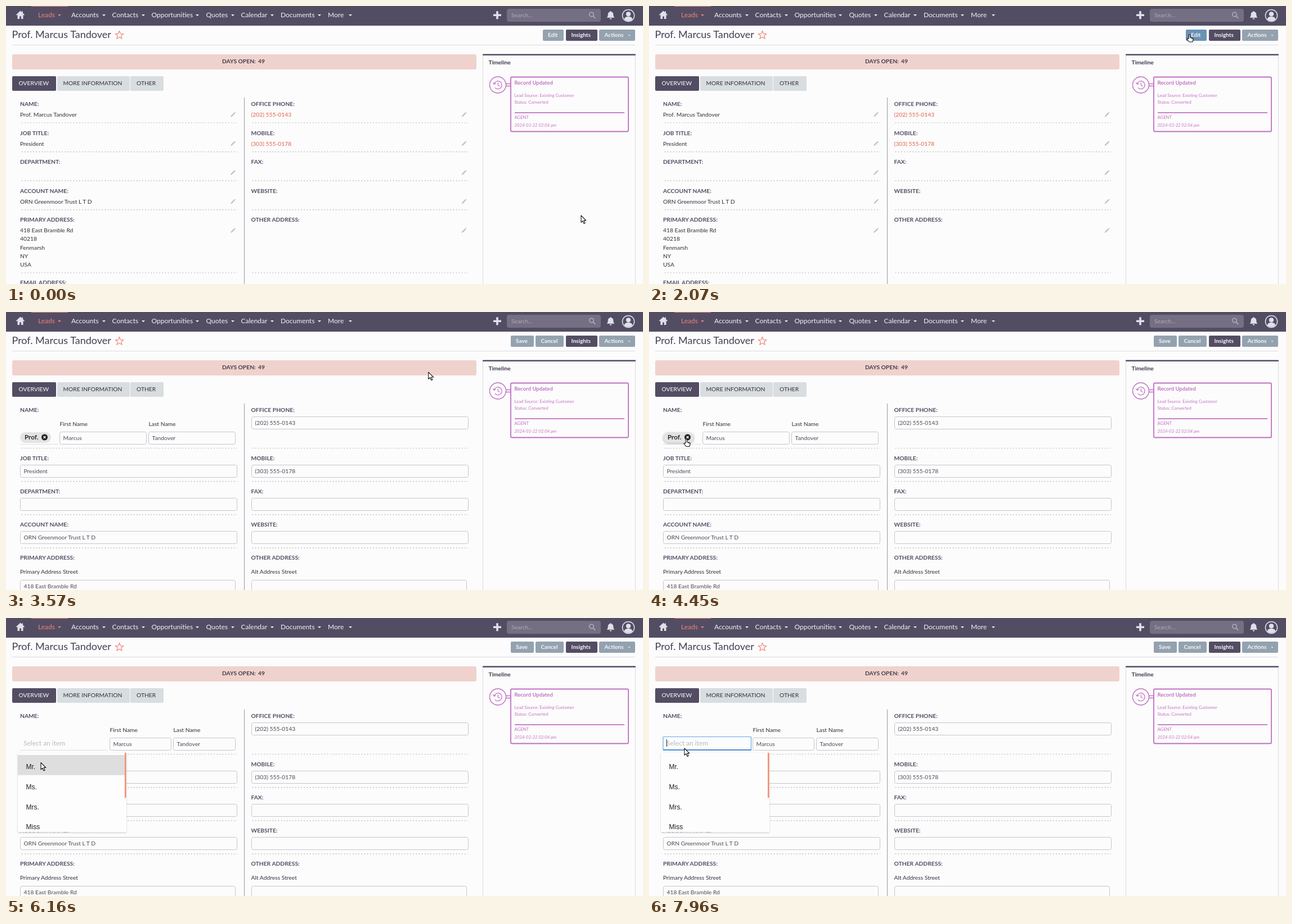
These frames come from a looping animation (1132x495 px, 7.99 s). An HTML page:

```html
<!DOCTYPE html>
<html lang="en">
<head>
<meta charset="utf-8">
<title>Lead record</title>
<style>
html, body { margin: 0; width: 100%; height: 100%; overflow: hidden; background: #fcfcfc; }
svg { display: block; width: 100vw; height: 100vh; }
text { font-family: Lato, sans-serif; font-size: 10.3px; fill: #353039; white-space: pre; }
.nav { font-size: 12px; fill: #f3f2f7; }
.label { font-weight: 700; fill: #534d64; }
.btn { font-size: 10px; font-weight: 700; fill: #f5f5f7; }
.link { fill: #e5604c; }
.field { fill: #4d4a55; }
.small { font-size: 7.7px; fill: #c274c4; }
.chip { font-size: 11.6px; font-weight: 700; fill: #2b2b2b; }
.hint { font-size: 12px; fill: #b9b9bd; }
.item { font-family: "Liberation Sans", Arial, sans-serif; font-size: 12px; fill: #222; }
</style>
</head>
<body>
<svg id="stage" viewBox="0 0 1132 495" preserveAspectRatio="none"></svg>
<script>
const LOOP = 7990;
const DARK = '#534d64', GREY = '#94a2af', BLUE = '#6a92b4', CORAL = '#f08377', PURPLE = '#bf6fc1', ICON = '#dfe1ea';
const FIRST = 'Marcus', LAST = 'Tandover', COMPANY = 'ORN Greenmoor Trust L T D';
const PHONES = ['(202) 555-0143', '(303) 555-0178'], STREET = '418 East Bramble Rd';

const text = (x, y, s, cls = '', extra = '') => `<text x="${x}" y="${y}" class="${cls}" ${extra}>${s}</text>`;
const rect = (x, y, w, h, fill, r = 0, extra = '') =>
  `<rect x="${x}" y="${y}" width="${w}" height="${h}" rx="${r}" fill="${fill}" ${extra}/>`;
const path = (d, stroke, w = 1, fill = 'none', extra = '') =>
  `<path d="${d}" stroke="${stroke}" stroke-width="${w}" fill="${fill}" ${extra}/>`;
const circle = (x, y, r, fill, extra = '') => `<circle cx="${x}" cy="${y}" r="${r}" fill="${fill}" ${extra}/>`;
const group = (id, body) => `<g id="${id}">${body}</g>`;
const caret = (x, y, fill, s = 3) => path(`M${x - s} ${y - s / 2}h${2 * s}l${-s} ${s}z`, 'none', 0, fill);
const dots = (x, y) => path(`M${x} ${y}H${x + 383}`, '#8e8e94', 1.2, 'none', 'stroke-dasharray="1.2 3.9"');
const input = (x, y, w, s = '', h = 22) =>
  rect(x + .5, y + .5, w - 1, h, '#fcfcfc', 3, 'stroke="#c6c6cd"') + text(x + 6.5, y + 14.6, s, 'field');
const button = (x, w, s, fill, tx, id = '') =>
  rect(x, 42, w, 20, fill, 2, id && `id="${id}"`) + text(tx, 55.3, s, 'btn');
const pencil = (x, y) => path(`M${x - 4} ${y + 4}l1-2.6 5.4-5.4 1.8 1.8-5.4 5.4z`, 'none', 0, '#c4c4c9') +
  path(`M${x + 2.8} ${y - 3.8}l1.2-1 1 1-1.1 1.2z`, 'none', 0, '#c4c4c9');

function navBar() {
  const menu = [['Leads', 57, 95], ['Accounts', 116, 174], ['Contacts', 188.5, 244], ['Opportunities', 258.5, 340],
    ['Quotes', 355.5, 403], ['Calendar', 417.5, 473], ['Documents', 488, 557], ['More', 572, 612]];
  return rect(0, 0, 1132, 35, DARK) + rect(45, 0, 65, 1, CORAL) +
    menu.map(([s, x, c], i) => text(x, 20.3, s, 'nav', i ? '' : `style="fill:${CORAL}"`) +
      caret(c, 16.5, i ? '#f3f2f7' : CORAL)).join('') +
    path('M25.5 8.5L18 15.6l1.2 1.2 1.3-1.2V23h3.6v-4.6h2.8V23h3.6v-7.4l1.3 1.2 1.2-1.2-3-2.8V9.4h-2v1.5z', 'none', 0, ICON) +
    path('M866 16.3h14M873 9.3v14', ICON, 3.6) +
    rect(890, 5, 167, 23, '#746f82', 4) + text(898, 19.6, 'Search...', '', 'style="fill:#aeabb8"') +
    circle(1040.5, 15, 3.8, 'none', 'stroke="#b0adba" stroke-width="1.5"') + path('M1043.3 17.8l4 4', '#b0adba', 1.8) +
    path('M1067.5 20.8c2-1.8 2.2-3.6 2.2-6 0-2.8 1.7-4.2 3.8-4.6v-.9h2v.9c2.1.4 3.8 1.8 3.8 4.6 0 2.4.2 4.2 2.2 6z', 'none', 0, ICON) +
    path('M1072.6 21.8h3.8a1.9 1.9 0 0 1-3.8 0z', 'none', 0, ICON) +
    circle(1106, 17, 10.6, 'none', `stroke="${ICON}" stroke-width="1.5"`) + circle(1106, 14.3, 4.1, ICON) +
    path('M1098.7 23.5c1-4 4-4.8 7.3-4.8s6.3.8 7.3 4.8a10 10 0 0 1-14.6 0z', 'none', 0, ICON);
}

function star(cx, cy, r) {
  let d = '';
  for (let i = 0; i < 10; i++) {
    const a = Math.PI * (i / 5 - .5), k = i % 2 ? r * .42 : r;
    d += `${i ? 'L' : 'M'}${(cx + k * Math.cos(a)).toFixed(1)} ${(cy + k * Math.sin(a)).toFixed(1)}`;
  }
  return path(d + 'z', '#ee8a7c', 1.2, 'none', 'stroke-linejoin="round"');
}

function timeline() {
  return path('M847.5 87V495M1118.5 87V495', '#d9d9de') + rect(847, 85.5, 272, 2.5, DARK, 1) +
    text(857.5, 103.5, 'Timeline', 'label', 'style="fill:#3f3a4c"') +
    rect(897, 126.5, 209, 97, 'none', 2, `stroke="${PURPLE}" stroke-width="1.8"`) +
    circle(874, 140.5, 14.5, 'none', `stroke="${PURPLE}" stroke-width="1.4"`) +
    path('M888 138.5h9M888 142.5h9', PURPLE, 1.3) +
    path('M867.5 138.5a7 7 0 1 1 1.3 6.8M865.5 136.3l2 3 3.2-1.6M874.3 136.5v4.5l3 1.8', PURPLE, 1.2) +
    text(903.5, 140, 'Record Updated', 'small', 'style="font-size:9.5px;font-weight:700"') +
    text(903.5, 161.5, 'Lead Source: Existing Customer', 'small') +
    text(903.5, 173.5, 'Status: Converted', 'small') +
    rect(904, 189, 195, 2, '#c883ca') +
    text(903.5, 201, 'AGENT', 'small') +
    text(903.5, 215, '2024-03-22 02:04 pm', 'small', 'font-style="italic"');
}

function frameParts() {
  return text(10.5, 57, `Prof. ${FIRST} ${LAST}`, '', 'style="font-size:18px;fill:#453f55"') + star(201.5, 52, 7.8) +
    path('M11 69.5H1118', '#dcdce0') +
    button(995, 56, 'Insights', DARK, 1004.5) + button(1054, 64, 'Actions', GREY, 1063.5) + caret(1107.5, 52.5, '#f5f5f7', 2) +
    rect(11, 86, 825, 27, '#f0d2cd', 3) + text(384, 102, 'DAYS OPEN:', 'label', 'style="fill:#443d50"') +
    text(448, 102, '49', 'label', 'style="fill:#443d50"') +
    rect(11, 125, 78, 26, DARK, 2) + rect(91, 125, 129, 26, '#d8dde0', 2) + rect(221, 125, 59, 26, '#d8dde0', 2) +
    text(22.5, 140.7, 'OVERVIEW', '', 'style="fill:#fff"') + text(101.5, 140.7, 'MORE INFORMATION') +
    text(232, 140.7, 'OTHER') + path('M423.5 163V495', '#9a98a2');
}

const LABELS = [['NAME:', 'OFFICE PHONE:'], ['JOB TITLE:', 'MOBILE:'], ['DEPARTMENT:', 'FAX:'],
  ['ACCOUNT NAME:', 'WEBSITE:'], ['PRIMARY ADDRESS:', 'OTHER ADDRESS:']];
const labelPair = ([a, b], y) => text(25, y, a, 'label') + text(435.5, y, b, 'label');
const dotPair = y => dots(28, y) + dots(438, y);

function viewForm() {
  const left = [`Prof. ${FIRST} ${LAST}`, 'President', '', COMPANY];
  const rows = LABELS.map((pair, i) => {
    const y = 178 + i * 51.6;
    return labelPair(pair, y) + text(25, y + 19, left[i] || '') + text(435.5, y + 19, PHONES[i] || '', 'link') +
      pencil(403, y + 15.5) + pencil(813.5, y + 15.5) + dotPair(i < 4 ? y + 30 : 475);
  });
  const address = [STREET, '40218', 'Fenmarsh', 'NY', 'USA'].map((s, i) => text(25, 403.3 + i * 15.1, s));
  return button(954, 37, 'Edit', GREY, 963, 'editBtn') + rows.join('') + address.join('') +
    text(25, 496, 'EMAIL ADDRESS:', 'label');
}

function editForm() {
  const left = ['', 'President', '', COMPANY];
  const rows = LABELS.map((pair, i) => {
    const y = i ? 204.7 + i * 59.1 : 178;
    let s = labelPair(pair, y);
    if (i < 4) {
      s += dotPair(242.5 + i * 59.2) + input(436, i ? Math.round(y + 8) : 186, 386, PHONES[i]);
      if (i) s += input(25, Math.round(y + 8), 386, left[i]);
    }
    return s;
  });
  return button(897, 41, 'Save', GREY, 906) + button(941, 50, 'Cancel', GREY, 950.5, 'cancelBtn') + rows.join('') +
    text(25, 466, 'Primary Address Street') + text(435.5, 466, 'Alt Address Street') +
    input(25, 477, 383, STREET, 30) + input(436, 477, 383, '', 30);
}

// Name row: first-name input at x with width w, last-name input at x2.
const nameRow = (id, x, w, x2) => group(id,
  path(`M25 235.5H${x - 3}`, '#dedee2') + text(x + .5, 202.7, 'First Name') + text(x2 + .5, 202.7, 'Last Name') +
  input(x, 213, w, FIRST) + input(x2, 213, 408 - x2, LAST));

const chip = (id, w, s) => group(id, rect(25, 214, w, 19, '#e3e3e3', 9.5) + text(33, 227, s, 'chip') +
  circle(w + 13.5, 223, 5.5, '#222') + path(`M${w + 11.5} 221l4 4m0-4l-4 4`, '#fff', 1.4));

function dropdown() {
  const items = ['Mr.', 'Ms.', 'Mrs.', 'Miss'].map((s, i) => text(35.5, 269.2 + i * 35.7, s, 'item'));
  return rect(21, 240, 193, 141.5, '#fdfdfd', 1, 'style="filter:drop-shadow(0 1px 1px rgba(0,0,0,.22))"') +
    rect(21, 244, 190, 35.7, '#dedede', 0, 'id="hover"') + items.join('') + rect(211, 240, 2.5, 80, '#f08c69');
}

const stage = document.getElementById('stage');
stage.innerHTML = rect(0, 0, 1132, 495, '#fcfcfc') + navBar() + frameParts() + timeline() +
  group('view', viewForm()) +
  group('edit', editForm() + nameRow('rowProf', 95, 155, 253) + nameRow('rowMr', 90, 157, 250) + nameRow('rowWide', 184, 110, 297) +
    chip('chipProf', 55, 'Prof.') + chip('chipMr', 46, 'Mr.') +
    group('empty', text(31, 226.6, 'Select an item', 'hint')) +
    group('ring', rect(25, 211.5, 156.5, 23, 'none', 1, 'stroke="#64a8ea" stroke-width="1.2"') + path('M25 234.8H182', '#3a80cc', 1.8)) +
    group('bar', path('M31.5 216v13', '#222', 1)) + group('list', dropdown())) +
  group('cursor',
    group('arrow', path('M0 0V12.3L2.9 9.7 5.1 14.5 7.1 13.6 5 8.9H8.8Z', '#111', 1.1, '#fff', 'stroke-linejoin="round"')) +
    group('hand', path('M-1.3 7.2V.8a1.2 1.2 0 0 1 2.5 0V5l1.8.2.3.4 1.7.2.3.5 1.2.3V9.5L5.3 13H-.4L-4.3 8.2q-.3-1.5 1.1-1.5z',
      '#111', 1.1, '#fff', 'stroke-linejoin="round"') + path('M3 5.6v2M5 6.2v1.8', '#111', .8)));

const el = {};
stage.querySelectorAll('[id]').forEach(n => el[n.id] = n);
const show = (id, on) => el[id].setAttribute('visibility', on ? 'inherit' : 'hidden');
const within = (t, a, b) => t >= a && t < b;
const ramp = (t, a, d) => Math.min(1, Math.max(0, (t - a) / d));

// time, x, y of the pointer tip
const TRACK = [[1060, 1022, 373], [1180, 1003, 335], [1270, 984, 295], [1340, 976, 245], [1400, 964, 165], [1460, 949, 96],
  [1510, 949, 96], [1610, 951, 73], [1780, 960, 50], [1950, 960, 50], [2070, 960.5, 51], [3330, 960.5, 51], [3420, 928, 66],
  [3490, 879, 79], [3550, 786, 102], [3600, 702, 114], [3660, 604, 115], [3710, 532, 112], [3770, 421, 119], [3830, 350, 125],
  [3920, 220, 160], [4000, 115, 195], [4100, 66, 225], [4420, 66, 225], [4450, 66.5, 226.5], [5590, 66.5, 226.5], [5870, 62, 257.5],
  [6680, 62, 257.5], [7000, 62, 224], [7190, 62, 220.5], [7500, 62, 220.5], [7700, 63, 232]];

function tip(t) {
  let i = 0;
  while (i < TRACK.length - 1 && TRACK[i + 1][0] <= t) i++;
  const a = TRACK[i], b = TRACK[i + 1] || a, k = b === a ? 0 : ramp(t, a[0], b[0] - a[0]);
  return [a[1] + (b[1] - a[1]) * k, a[2] + (b[2] - a[2]) * k];
}

function draw(t) {
  const edit = t >= 2780;
  const prof = t < 4840, mr = within(t, 6230, 7320), wide = !prof && !mr;
  show('view', !edit);
  show('edit', edit);
  el.editBtn.setAttribute('fill', t >= 1640 ? BLUE : GREY);
  el.cancelBtn.setAttribute('fill', t < 3390 ? BLUE : GREY);
  show('rowProf', edit && prof);
  show('rowMr', mr);
  show('rowWide', wide);
  show('chipProf', within(t, 2960, 4840));
  show('chipMr', mr);
  const glow = 'drop-shadow(0 1px 1.5px rgba(0,0,0,.3))';
  el.chipProf.style.filter = t > 4150 ? glow : 'none';
  el.chipMr.style.filter = t > 6950 ? glow : 'none';
  show('empty', wide);
  show('ring', within(t, 4900, 5850) || t >= 7440);
  show('bar', within(t, 5380, 5850) || t >= 7960);
  const open = mr ? 1 - ramp(t, 6230, 110) : t > 7000 ? ramp(t, 7490, 120) : ramp(t, 4910, 120);
  show('list', open > 0);
  el.list.setAttribute('opacity', open);
  show('hover', within(t, 6030, 6400));
  const hand = within(t, 1640, 3370) || within(t, 4060, 4840) || within(t, 6980, 7330);
  show('hand', hand);
  show('arrow', !hand);
  const [x, y] = tip(t);
  el.cursor.setAttribute('transform', `translate(${x.toFixed(2)} ${y.toFixed(2)})`);
}

const start = performance.now();
function tick() {
  draw((performance.now() - start) % LOOP);
  requestAnimationFrame(tick);
}
draw(0);
requestAnimationFrame(tick);
</script>
</body>
</html>
```
